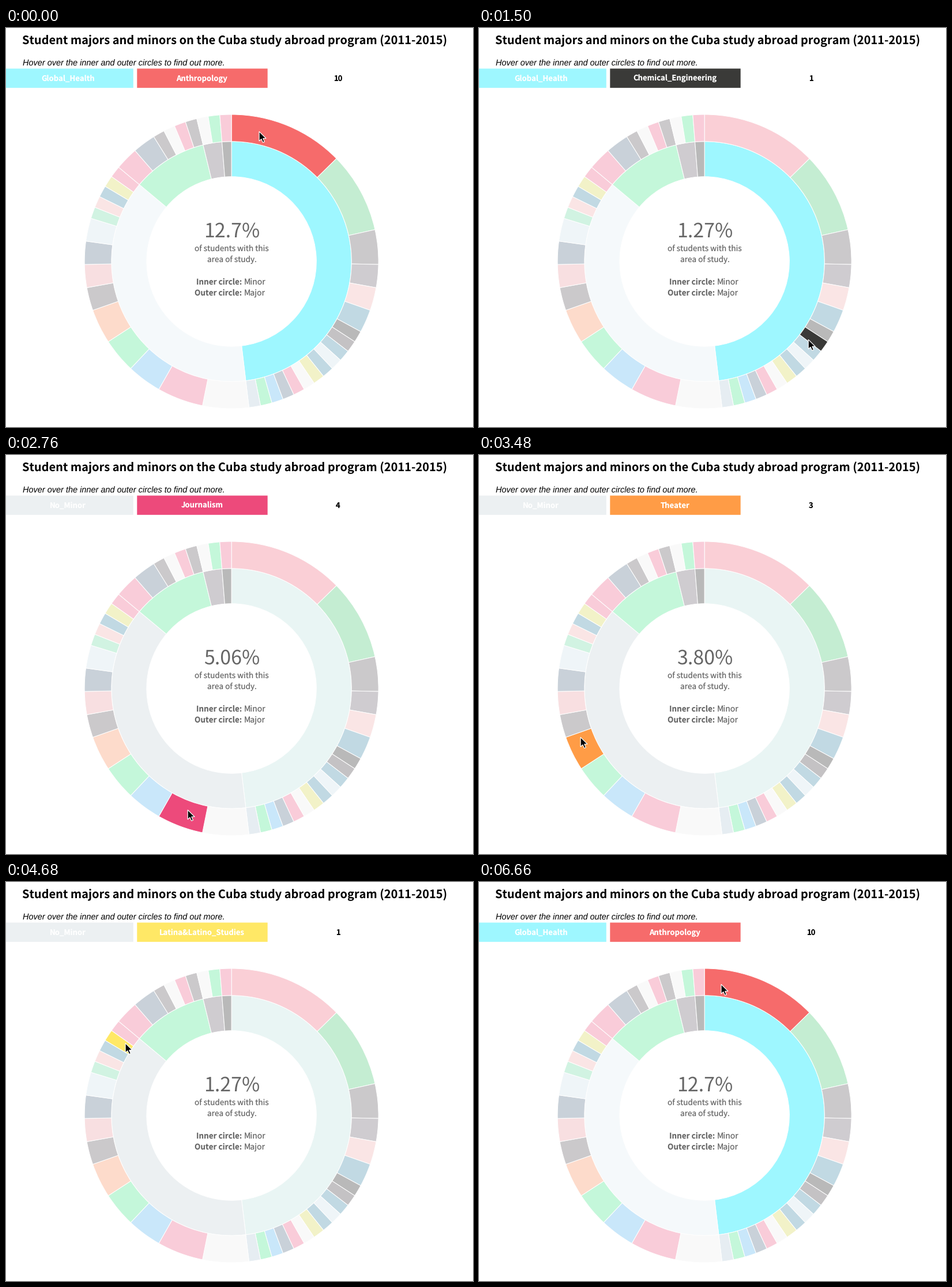
These frames come from a looping animation (810x692 px, 7080 ms). A matplotlib script:

```python
import numpy as np
import matplotlib.pyplot as plt
from matplotlib.animation import FuncAnimation
from matplotlib.colors import to_rgb
from matplotlib.patches import Polygon, Rectangle, Wedge

W, H, DPI = 810, 692, 100
STEP, FRAMES = 60, 118
CX, CY, R = 391.1, 405, 255
TEXT_X = 391.5
R_IN, R_MID = R * np.sqrt(1 / 3), R * np.sqrt(2 / 3)
FADE = 0.3

plt.rcParams["font.family"] = "Noto Sans CJK JP"
plt.rcParams["text.hinting"] = "none"

# Faded tone of each hue, and the full tone where it is not simply unfaded.
FADED = dict(
    coral="#facfd6", green="#c4edd2", gray="#cbc9cb", mauve="#cfccd0",
    blush="#fae5e5", rose="#f8dfe1", blue="#c1d9e3", dark="#b9b9b9",
    char="#c4c2c4", ice="#eff5f8", yellow="#f2f2c8", white="#f9f9f9",
    pink="#f9ccd9", slate="#c9d1d9", sky="#c9e7fa", mint="#c4f7da",
    peach="#fddbcb", aqua="#d1f3e2", mist="#e6edf2",
    cyan="#e9f5f4", pale="#f5f9fb")
FULL = dict(
    coral="#f66b6b", mauve="#5c5c80", char="#3a3a38", yellow="#ffe866",
    pink="#ed4a7b", mint="#2bff8c", peach="#ff9c46", cyan="#9ef7ff",
    pale="#ecf0f2", dark="#3a3a38")

# minor, hue, [(major, students, hue), ...]
TREE = [
    ("Global_Health", "cyan", [
        ("Anthropology", 10, "coral"), ("Biology", 7, "green"),
        ("Psychology", 3, "gray"), ("Chemistry", 2, "mauve"),
        ("Sociology", 2, "blush"), ("History", 2, "blue"),
        ("Economics", 1, "dark"), ("Chemical_Engineering", 1, "char"),
        ("Philosophy", 1, "blue"), ("English", 1, "ice"),
        ("Art_History", 1, "blue"), ("Latina&Latino_Studies", 1, "yellow"),
        ("Linguistics", 1, "white"), ("Journalism", 1, "pink"),
        ("Political_Science", 1, "slate"), ("Neuroscience", 1, "sky"),
        ("Spanish", 1, "mint"), ("Statistics", 1, "mist")]),
    ("No_Minor", "pale", [
        ("Linguistics", 4, "white"), ("Journalism", 4, "pink"),
        ("Neuroscience", 3, "sky"), ("Spanish", 3, "mint"),
        ("Theater", 3, "peach"), ("Psychology", 2, "gray"),
        ("Education", 2, "rose"), ("Political_Science", 2, "slate"),
        ("English", 2, "ice"), ("Geography", 1, "aqua"),
        ("Sociology", 1, "blush"), ("History", 1, "blue"),
        ("Latina&Latino_Studies", 1, "yellow"), ("Dance", 1, "pink")]),
    ("Spanish", "mint", [
        ("Journalism", 2, "pink"), ("Political_Science", 2, "slate"),
        ("Psychology", 1, "gray"), ("Linguistics", 1, "white"),
        ("Dance", 1, "pink"), ("Economics", 1, "gray")]),
    ("Chemistry", "mauve", [("Linguistics", 1, "white"), ("Spanish", 1, "mint")]),
    ("Economics", "dark", [("Journalism", 1, "pink")]),
]
TOTAL = sum(n for _, _, majors in TREE for _, n, _ in majors)

# Pointer path: time (ms), clockwise angle from the top, radius.
PATH = np.array([
    (0, 11.87, 230.9), (120, 11.87, 230.9), (720, 62, 230), (960, 62, 230),
    (1500, 126.9, 224.6), (1800, 126.9, 224.6), (2520, 185, 232),
    (2760, 200, 223.5), (3240, 230, 230), (3480, 248.7, 231.3),
    (3960, 273, 230), (4200, 283, 230), (4320, 283, 230),
    (4680, 304.3, 223.4), (4980, 324, 230), (5340, 324, 230),
    (5580, 355.2, 233.8), (5820, 374.9, 227.6), (6540, 374.9, 227.6),
    (6660, 367.1, 229.8)])
ARROW = np.array([(0.5, 0.5), (0.5, 17), (4.3, 13.5), (7, 19.5),
                  (9.8, 18.3), (7.2, 12.4), (12.5, 12.4)])


def full_tone(hue):
    if hue in FULL:
        return FULL[hue]
    rgb = np.array(to_rgb(FADED[hue]))
    return tuple(np.clip(1 - (1 - rgb) / FADE, 0, 1))


fig = plt.figure(figsize=(W / DPI, H / DPI), dpi=DPI, facecolor="white")
ax = fig.add_axes([0, 0, 1, 1])
ax.set_xlim(0, W)
ax.set_ylim(H, 0)
ax.axis("off")


def px(size):
    return size * 72 / DPI


def label(x, y, text, size, color="black", ha="center", **style):
    return ax.text(x, y, text, fontsize=px(size), color=color, ha=ha,
                   va="baseline", **style)


def ring_part(start, count, inner, outer, hue):
    a, b = (360 * k / TOTAL - 90 for k in (start, start + count))
    return ax.add_patch(Wedge((CX, CY), outer, a, b, width=outer - inner,
                              facecolor=FADED[hue], edgecolor="white",
                              linewidth=px(1)))


def bar(left, right):
    return ax.add_patch(Rectangle((left, 70.4), right - left, 33.4,
                                  linewidth=0, snap=False))


minors, majors = [], []
start = 0
for minor, hue, children in TREE:
    size = sum(n for _, n, _ in children)
    minors.append((minor, hue, ring_part(start, size, R_IN, R_MID, hue)))
    for major, n, tone in children:
        patch = ring_part(start, n, R_MID, R, tone)
        majors.append((start, n, major, tone, patch, len(minors) - 1))
        start += n

label(28, 28, "Student majors and minors on the Cuba study abroad program "
      "(2011-2015)", 20, ha="left", weight="bold")
label(29, 66, "Hover over the inner and outer circles to find out more.", 14.55,
      ha="left", family="Liberation Sans", style="italic")

GRAY = "#666666"
percent = label(TEXT_X, 362.5, "", 34, GRAY)
label(TEXT_X, 387, "of students with this", 13.6, GRAY)
label(TEXT_X, 406, "area of study.", 13.6, GRAY)
for y, ring, kind in ((445, "Inner", "Minor"), (464, "Outer", "Major")):
    label(409, y, ring + " circle:", 13.5, GRAY, "right", weight="bold")
    label(412.5, y, kind, 14, GRAY, "left")

minor_bar, major_bar = bar(0, 220.8), bar(227.3, 453.7)
minor_text = label(107.5, 92, "", 13.1, "white", weight="bold")
major_text = label(340, 92, "", 13.1, "white", weight="bold")
count_text = label(575.5, 92, "", 13.1, weight="bold")
cursor = ax.add_patch(Polygon(ARROW, facecolor="black", edgecolor="white",
                              linewidth=px(1.2), joinstyle="miter", zorder=9))


def update(frame):
    t = frame * STEP
    angle = np.interp(t, PATH[:, 0], PATH[:, 1])
    radius = np.interp(t, PATH[:, 0], PATH[:, 2])
    theta = np.radians(angle - 90)
    tip = np.array([CX + radius * np.cos(theta), CY + radius * np.sin(theta)])
    cursor.set_xy(ARROW + tip)

    student = angle % 360 / 360 * TOTAL
    for first, n, major, hue, patch, parent in majors:
        hovered = first <= student < first + n
        patch.set_facecolor(full_tone(hue) if hovered else FADED[hue])
        if hovered:
            active = parent
            major_bar.set_facecolor(full_tone(hue))
            major_text.set_text(major)
            count_text.set_text(str(n))
            percent.set_text(f"{100 * n / TOTAL:#.3g}%")
    for i, (_, hue, patch) in enumerate(minors):
        patch.set_facecolor(full_tone(hue) if i == active else FADED[hue])
    minor, hue, _ = minors[active]
    minor_bar.set_facecolor(full_tone(hue))
    minor_text.set_text(minor)
    return []


anim = FuncAnimation(fig, update, frames=FRAMES, interval=STEP,
                     repeat=True, repeat_delay=0, blit=False)
plt.show()
```
